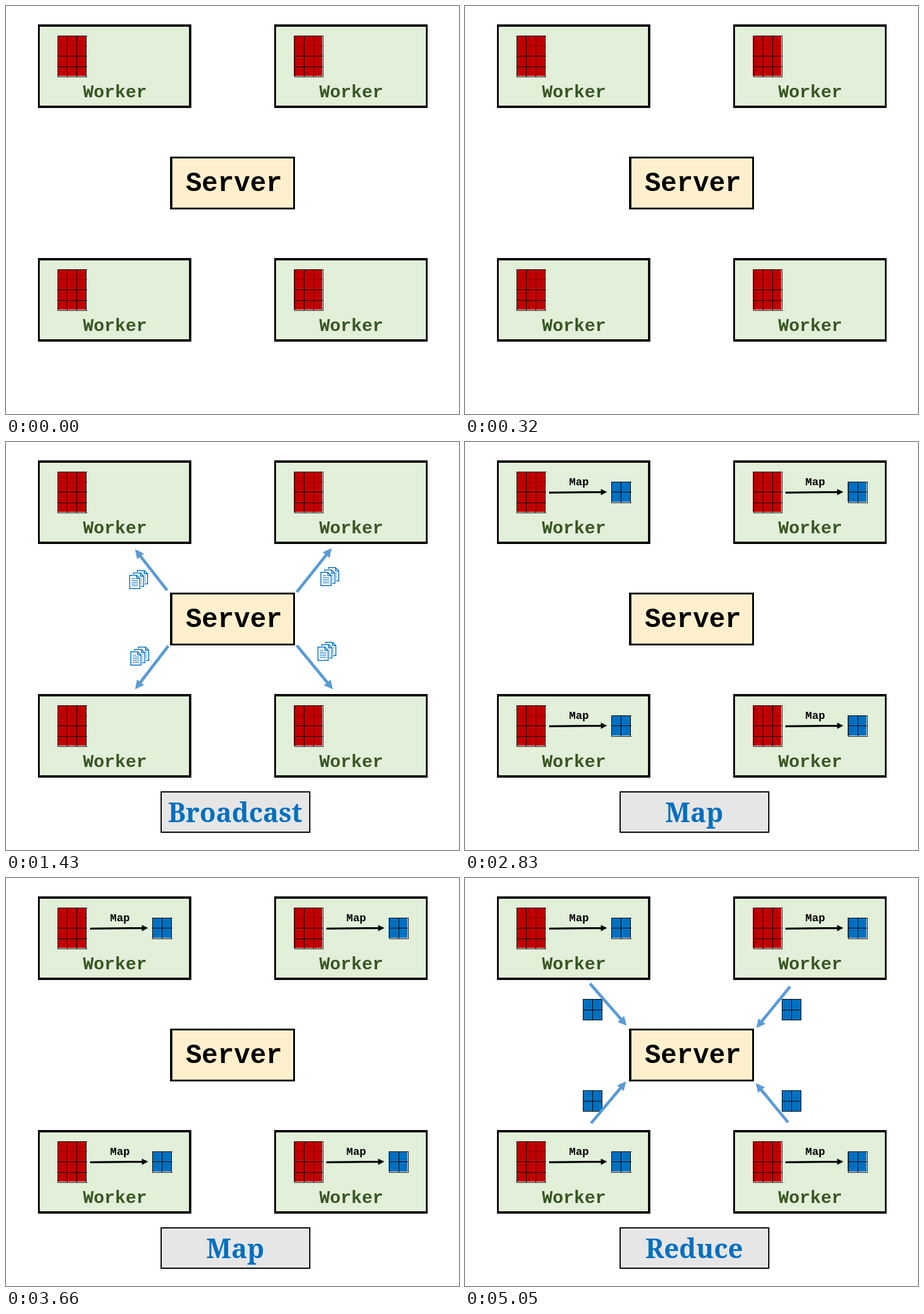
These frames come from a looping animation (765 by 688 pixels, 5.61 s). An HTML page:

```html
<!DOCTYPE html>
<html lang="en">
<head>
<meta charset="utf-8">
<title>Broadcast, map, reduce</title>
<style>
  html, body { margin: 0; width: 100%; height: 100%; overflow: hidden; background: #fff; }
  svg { display: block; width: 100%; height: 100%; }
  text { text-anchor: middle; font: bold 30px "Liberation Mono", monospace; }
  .worker { fill: #375623; }
  .server { font-size: 45.3px; }
  .map { font-size: 18.6px; }
  .title { font: bold 44.7px "Noto Serif", serif; fill: #0070c0; }
  .crisp { shape-rendering: crispEdges; }
</style>
</head>
<body>
<svg id="stage" viewBox="0 0 765 688"></svg>
<script>
const RED = "#c00000", BLUE = "#0070c0", ARROW = "#5b9bd5";
const LOOP = 5610;

const rect = (x, y, w, h, fill) =>
  `<rect class="crisp" x="${x}" y="${y}" width="${w}" height="${h}" fill="${fill}"/>`;

// Box given by its outer edges, with border widths per side.
const box = (x, y, w, h, fill, left, top = left, right = left, bottom = top) =>
  rect(x, y, w, h, "#000") + rect(x + left, y + top, w - left - right, h - top - bottom, fill);

const label = (x, y, text, cls) => `<text class="${cls}" x="${x}" y="${y}">${text}</text>`;

const group = (id, content) => `<g id="${id}">${content}</g>`;

// edge: "open" lets the row lines overhang, "rim" shifts the lines off the fill, "closed" is plain.
function grid(x, y, cols, rows, color, edge) {
  const top = Math.floor(y);
  const width = cols * 16 + 1;
  const height = Math.floor(y + rows * 17.4) - top;
  const left = edge === "rim" ? x + 1 : x;
  let out = rect(x, top, width, height, color);
  if (edge !== "closed") out += rect(x, top + height - 1, width, 1, "#fff");
  if (edge === "rim") out += rect(x + width - 1, top, 1, height, "#fff");
  for (let c = 0; c <= cols; c++) out += rect(left + c * 16, top, 1, height + 1, "#000");
  for (let r = 0; r <= rows; r++) {
    const soft = color === RED && r === 1;
    out += rect(left, Math.floor(y + r * 17.4), width + (edge === "open"), 1, soft ? "#900000" : "#000");
  }
  return out;
}

function arrow(x1, y1, x2, y2, color = ARROW, width = 5, head = 15) {
  const angle = Math.atan2(y2 - y1, x2 - x1) * 180 / Math.PI;
  const length = Math.hypot(x2 - x1, y2 - y1);
  const base = length - head, half = head / 2;
  return `<g transform="translate(${x1} ${y1}) rotate(${angle})" fill="${color}">
    <path d="M0 ${-width / 2}H${base + 1}V${width / 2}H0z
      M${base} ${-half}L${length} 0L${base} ${half}z"/></g>`;
}

// Page with a folded corner and lines of writing.
const sheet = (x, y) => `<g transform="translate(${x} ${y})" fill="none" stroke="${BLUE}">
  <path d="M0 0H13L19 6V24H0z" fill="#fff" stroke="#fff" stroke-width="2"/>
  <path d="M.8 .8H12.5L18 6.3V23.2H.8zM12.5 .8V6.3H18" stroke-width="1.5"/>
  <path d="M4 6.5H10M4 9.5H15M4 12.5H15M4 15.5H15M4 18.5H15" stroke-width="1.2"/></g>`;

const documents = (x, y) => sheet(x + 13, y) + sheet(x + 6.5, y + 4) + sheet(x, y + 8);

const corners = [[0, 0], [399, 0], [0, 394], [399, 394]];
const atWorkers = draw => corners.map(([x, y]) => draw(x, y, x ? "rim" : "open")).join("");

const workers = atWorkers((x, y, edge) =>
  box(54 + x, 31 + y, 259, 141, "#e2efd9", 3, 4, x ? 3 : 4) +
  grid(87 + x, 50 + y, 3, 4, RED, edge) +
  label(184 + x, 154 + y, "Worker", "worker"));

const server = box(277, 254, 211, 89, "#fff0cd", 4, 3, 3) + label(385, 312, "Server", "server");

const mapping = atWorkers((x, y, edge) =>
  label(192.5 + x, 73 + y, "Map", "map") +
  arrow(142 + x, 85.3 + y, 240 + x, 84.3 + y, "#000", 3.2, 10.5) +
  grid(247 + x, 67.4 + y, 2, 2, BLUE, edge));

const broadcast =
  arrow(272, 250, 218, 181) + arrow(491, 253, 550, 179) +
  arrow(274, 344, 218, 417) + arrow(491, 343, 552, 417) +
  documents(208, 216) + documents(531, 211) + documents(210, 345) + documents(526, 337);

const reduce =
  [[199, 204.6], [535, 204.6], [199, 358.6], [535, 358.6]]
    .map(([x, y]) => grid(x, y, 2, 2, BLUE, "closed")).join("") +
  arrow(211, 178, 273, 249) + arrow(549, 183, 492, 253) +
  arrow(213, 413.5, 272, 343) + arrow(545.5, 412, 491, 346);

const pointer = `<path d="M752.5 685.5Q754 682.5 756 684.5L757 687.5M757 685L758.5 677.5
  Q760 675 761 677.5L760.5 683M761 678Q763 674.5 764 677.5L763.5 683M764 677.5L765.5 676"
  fill="none" stroke="#000" stroke-width="1.2"/>`;

document.getElementById("stage").innerHTML =
  workers + server +
  group("pointer", pointer) +
  group("broadcast", broadcast) +
  group("mapping", mapping) +
  group("reduce", reduce) +
  group("caption", box(261, 589, 253, 70, "#e7e6e6", 2) + label(387, 641, "", "title"));

const title = document.querySelector(".title");
const show = (id, visible) => {
  document.getElementById(id).style.display = visible ? "" : "none";
};

function render(now) {
  const t = now % LOOP;
  show("pointer", t >= 270 && t < 320);
  show("broadcast", t >= 1430 && t < 2830);
  show("mapping", t >= 2830);
  show("reduce", t >= 4220);
  show("caption", t >= 1430);
  title.textContent = t < 2830 ? "Broadcast" : t < 4220 ? "Map" : "Reduce";
}

const start = performance.now();
function tick() {
  render(performance.now() - start);
  requestAnimationFrame(tick);
}
tick();
</script>
</body>
</html>
```
